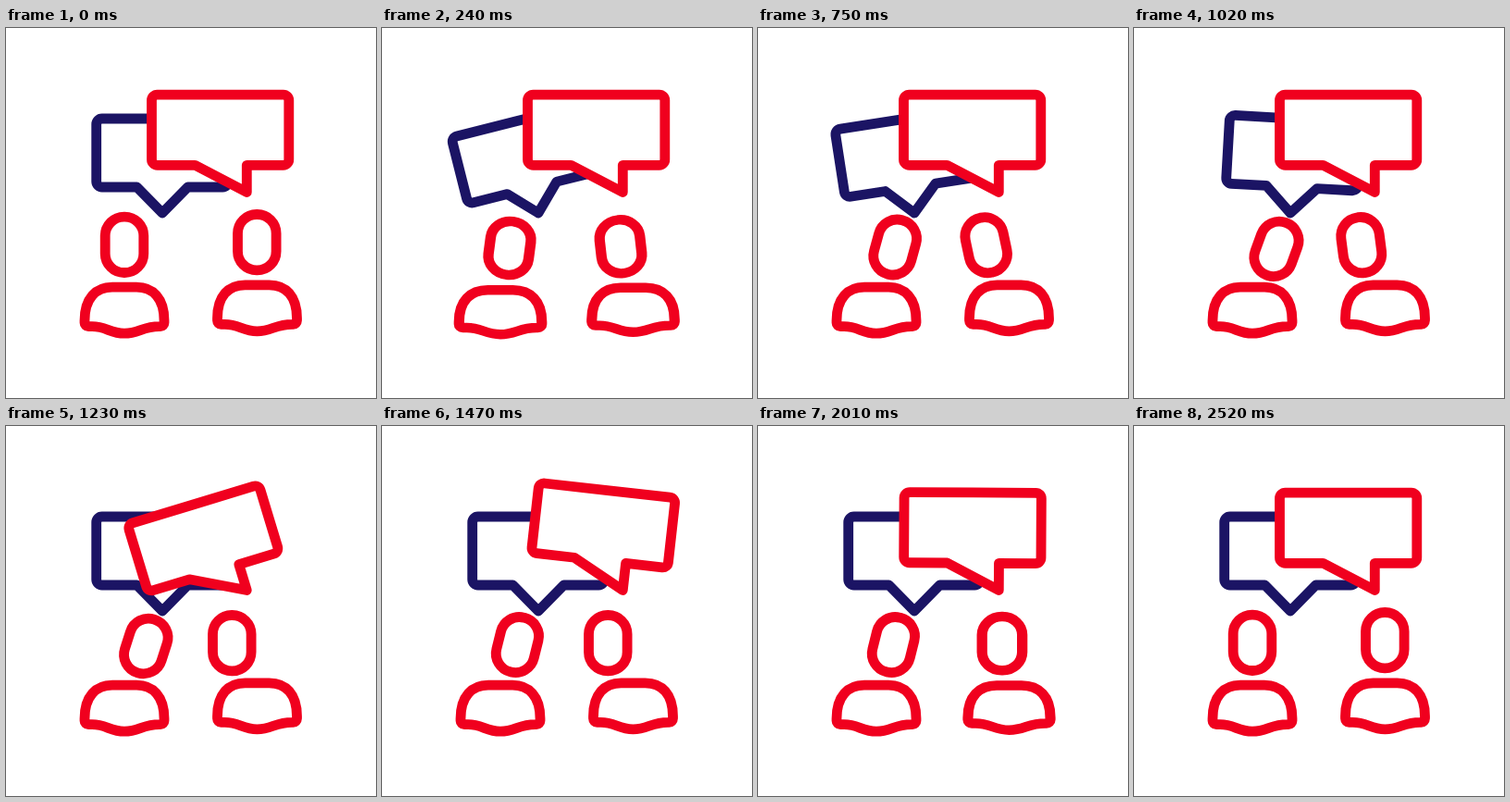
An HTML page with a canvas that plays this animation: 400 by 400 pixels, repeating every 4.55 s.

```html
<!DOCTYPE html>
<html lang="en">
<head>
<meta charset="utf-8">
<title>Conversation</title>
<style>
html, body { margin: 0; width: 100%; height: 100%; overflow: hidden; background: #fff; }
canvas { display: block; width: 100vw; height: 100vh; }
</style>
</head>
<body>
<canvas id="stage"></canvas>
<script>
const canvas = document.getElementById('stage');
const ctx = canvas.getContext('2d');
const RED = '#f0001e', BLUE = '#1b1464';
const LOOP = 4550, STEP = 30, MOVE = 400;
const ENTER = 30, RED_TALK = 1150, STRAIGHTEN = 850, RIGHT_BACK = 1750, LEFT_BACK = 2030;

const rad = deg => deg * Math.PI / 180;
const progress = (t, start, length) => Math.min(1, Math.max(0, (t - start) / length));
const ease = (t, start) => (1 - Math.cos(Math.PI * progress(t, start, MOVE))) / 2;
const bell = (t, start, length = MOVE) => Math.sin(Math.PI * progress(t, start, length));

// Rocking in degrees: a sine wave that dies down linearly.
function rock(t, start) {
  const s = Math.max(0, t - start);
  return -23.5 * Math.max(0, 1 - s / 1150) * Math.sin(Math.PI * s / 285);
}

// Draws a path in a frame that is moved, turned and scaled.
function pose(x, y, angle, sx, sy, path) {
  ctx.save();
  ctx.translate(x, y);
  ctx.rotate(rad(angle));
  ctx.scale(sx, sy);
  ctx.beginPath();
  path();
  ctx.restore();
}

// Speech bubble around the tip of its tail at (x, y).
function bubble(x, y, [l, t, r, b], [tailRight, tailLeft], color, angle) {
  const k = 6;
  pose(x, y, angle, 1, 1, () => {
    ctx.moveTo((l + r) / 2, t);
    ctx.arcTo(r, t, r, b, k);
    ctx.arcTo(r, b, l, b, k);
    ctx.lineTo(tailRight, b);
    ctx.lineTo(0, 0);
    ctx.lineTo(tailLeft, b);
    ctx.arcTo(l, b, l, t, k);
    ctx.arcTo(l, t, r, t, k);
    ctx.closePath();
    ctx.fillStyle = '#fff';
    ctx.fill();
    ctx.strokeStyle = color;
    ctx.stroke();
  });
}

function head(x, y, angle, squash) {
  pose(x, y + 3 * squash, angle, 1 + 0.05 * squash, 1 - 0.04 * squash, () => {
    ctx.roundRect(-20.8, -30.2, 41.6, 60.4, 20.5);
    ctx.stroke();
  });
}

// Shoulders, placed by the middle of the lower edge.
function body(x, y, squash) {
  pose(x, y + squash, 0, 1 + 0.04 * squash, 1 - 0.04 * squash, () => {
    ctx.moveTo(-43, -14);
    ctx.bezierCurveTo(-43, -38, -31, -50, -13, -50);
    ctx.lineTo(13, -50);
    ctx.bezierCurveTo(31, -50, 43, -38, 43, -14);
    ctx.arcTo(43, -7.5, 36, -7.5, 4);
    ctx.bezierCurveTo(20, -8, 16, 0, 0, 0);
    ctx.bezierCurveTo(-16, 0, -20, -8, -36, -7.5);
    ctx.arcTo(-43, -7.5, -43, -14, 4);
    ctx.closePath();
    ctx.stroke();
  });
}

// Leans in around the chest and nods while the bubbles change turns.
function leftPerson(t) {
  const lean = 14 * (ease(t, ENTER) - ease(t, LEFT_BACK)) + 6 * bell(t, 700, 680);
  const squash = bell(t, ENTER) + bell(t, LEFT_BACK);
  const reach = 76;
  head(128 + reach * Math.sin(rad(lean)), 310.3 - reach * Math.cos(rad(lean)), lean, squash);
  body(128, 330.2, squash);
}

// Slides in tilted, straightens up, then slides back.
function rightPerson(t) {
  const near = ease(t, ENTER) - ease(t, RIGHT_BACK);
  const tilt = -12 * (ease(t, ENTER) - ease(t, STRAIGHTEN));
  const squash = bell(t, ENTER) + bell(t, RIGHT_BACK);
  head(271.3 - 27 * near - 0.2 * tilt, 231.7 + 3 * near, tilt, squash);
  body(271.5, 327.8, squash);
}

function draw(t) {
  const dpr = devicePixelRatio || 1;
  const w = Math.round(innerWidth * dpr), h = Math.round(innerHeight * dpr);
  if (canvas.width !== w || canvas.height !== h) {
    canvas.width = w;
    canvas.height = h;
  }
  ctx.setTransform(w / 400, 0, 0, h / 400, 0, 0);
  ctx.fillStyle = '#fff';
  ctx.fillRect(0, 0, 400, 400);
  ctx.lineWidth = 10.8;
  ctx.lineJoin = 'round';

  bubble(169, 200, [-71.3, -102, 71.3, -28], [27.5, -27.5], BLUE, rock(t, ENTER));
  bubble(260.3, 177.5, [-102.8, -105.4, 45.5, -29.2], [0, -56], RED, rock(t, RED_TALK));

  ctx.strokeStyle = RED;
  leftPerson(t);
  rightPerson(t);
}

const start = performance.now();
function tick() {
  const t = (performance.now() - start) % LOOP;
  draw(Math.floor(t / STEP) * STEP);
  requestAnimationFrame(tick);
}
tick();
</script>
</body>
</html>
```
